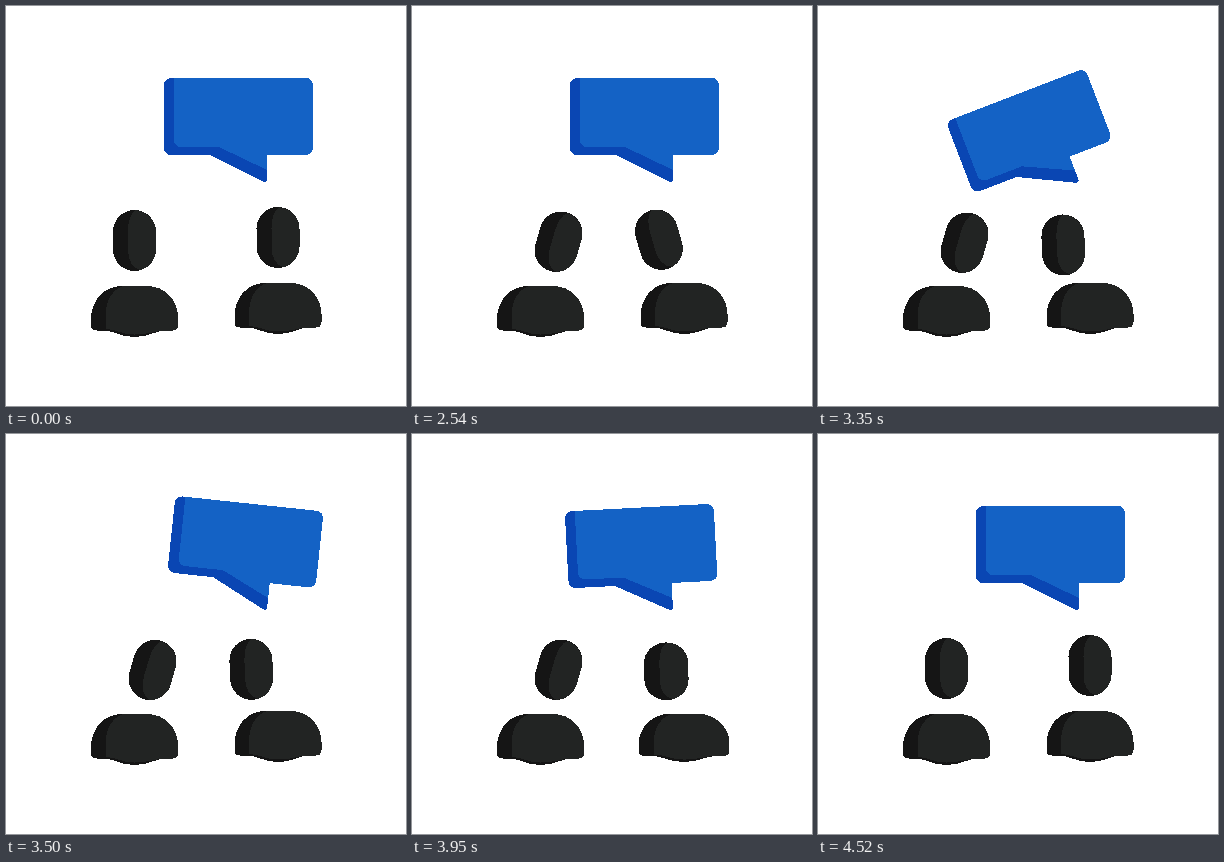
Animation of 400 by 400 pixels, one loop 4550 ms. Source, as an HTML page:

```html
<!DOCTYPE html>
<html lang="en">
<head>
<meta charset="utf-8">
<title>Two people talking</title>
<style>
  html, body { margin: 0; width: 100%; height: 100%; overflow: hidden; background: #fff; }
  svg { display: block; width: 100%; height: 100%; shape-rendering: crispEdges; }
  .dark { fill: #151515; }
  .light { fill: #222423; }
</style>
</head>
<body>
<svg viewBox="0 0 400 400">
  <defs>
    <g id="head">
      <rect class="dark" x="-21.5" y="-30.5" width="43" height="61" rx="21.5"/>
      <path class="light" d="M1-30.4C-4-27-6.5-19-6.5-9V9C-6.5 20-2 28 6 29.8C15 27 21.5 19 21.5 9V-9C21.5-20 13-29 1-30.4Z"/>
    </g>
    <g id="body">
      <path class="dark" d="M-43.5-12V-18C-43.5-37-30-51-13-51H13C30-51 43.5-37 43.5-20V-12Q43.5-6.500 38-6.500H32C21-6.500 14 0 0 0S-21-6.500-31-6.500H-38Q-43.5-6.500-43.5-12Z"/>
      <path class="light" d="M-11-51H13C30-51 43.5-37 43.5-20V-12Q43.5-6.500 38-6.500H32C21-6.500 14-2.500 0-2.500S-18-8-29-8V-20C-29-36-22-48-11-51Z"/>
    </g>
  </defs>
  <g id="bubble">
    <path fill="#0a46b3" d="M166 72H299Q307 72 307 80V141Q307 149 299 149H261V173Q261 177 257 175.500L204 149H166Q158 149 158 141V80Q158 72 166 72Z"/>
    <path fill="#1462c5" d="M168 72H299Q307 72 307 80V141Q307 149 299 149H261V164L213 141H176Q168 141 168 133Z"/>
  </g>
  <use id="leftBody" href="#body"/>
  <use id="rightBody" href="#body"/>
  <use id="leftHead" href="#head"/>
  <use id="rightHead" href="#head"/>
</svg>
<script>
const LOOP = 4550, START = 2030, STEP = 30;
const SWING_START = 3080, HALF_SWING = 250, SWINGS = 5;
const NOD_START = 2570, NOD_TIME = 510, NODS = 2;

const people = [
  { name: 'left', x: 128.5, base: 331, shift: 20, sink: 1.5, tilt: 16, nod: 1, straighten: 0,
    out: 1970, back: 3970 },
  { name: 'right', x: 272, base: 328, shift: -27, sink: 2.5, tilt: -16, nod: 5, straighten: 0.87,
    out: 2030, back: 3790 }
];
const MOVE_TIME = 410, HEAD_HEIGHT = 96.5;

const progress = (t, start, time) => Math.min(1, Math.max(0, (t - start) / time));
const ease = p => p * p * (3 - 2 * p);
const bump = p => Math.sin(Math.PI * p) ** 2;

// Swings alternate sides, each one smaller than the last.
function bubbleAngle(t) {
  const swings = progress(t, SWING_START, HALF_SWING * SWINGS) * SWINGS;
  const n = Math.floor(swings);
  const peak = i => i > 0 && i < SWINGS ? (-1) ** i * 29 * (1 - i / SWINGS) ** 1.3 : 0;
  return peak(n) + (peak(n + 1) - peak(n)) * ease(swings - n);
}

function setTransform(id, value) {
  document.getElementById(id).setAttribute('transform', value);
}

function drawPerson(p, t) {
  const out = progress(t, p.out, MOVE_TIME);
  const back = progress(t, p.back, MOVE_TIME);
  const lean = ease(out) - ease(back);
  const squash = bump(out) + bump(back);
  const nod = bump(progress(t, NOD_START, NOD_TIME * NODS) * NODS);
  const straight = p.straighten * ease(progress(t, NOD_START, NOD_TIME / 2));

  const x = p.x + p.shift * lean;
  const y = p.base - HEAD_HEIGHT + p.sink * lean + 4.7 * squash + p.nod * nod;
  const angle = p.tilt * lean * (1 - straight);
  setTransform(p.name + 'Body',
    `translate(${p.x} ${p.base}) scale(${1 + 0.05 * squash} ${1 - 0.06 * squash})`);
  setTransform(p.name + 'Head',
    `translate(${x} ${y}) scale(${1 + 0.03 * squash} ${1 - 0.06 * squash}) rotate(${angle} 0 -7)`);
}

function draw(now) {
  const elapsed = now % LOOP;
  const t = elapsed < START ? 0 : START + Math.floor((elapsed - START) / STEP) * STEP;
  setTransform('bubble', `rotate(${bubbleAngle(t)} 260.5 175)`);
  people.forEach(p => drawPerson(p, t));
}

const begin = performance.now();
function tick() {
  draw(performance.now() - begin);
  requestAnimationFrame(tick);
}
tick();
</script>
</body>
</html>
```
